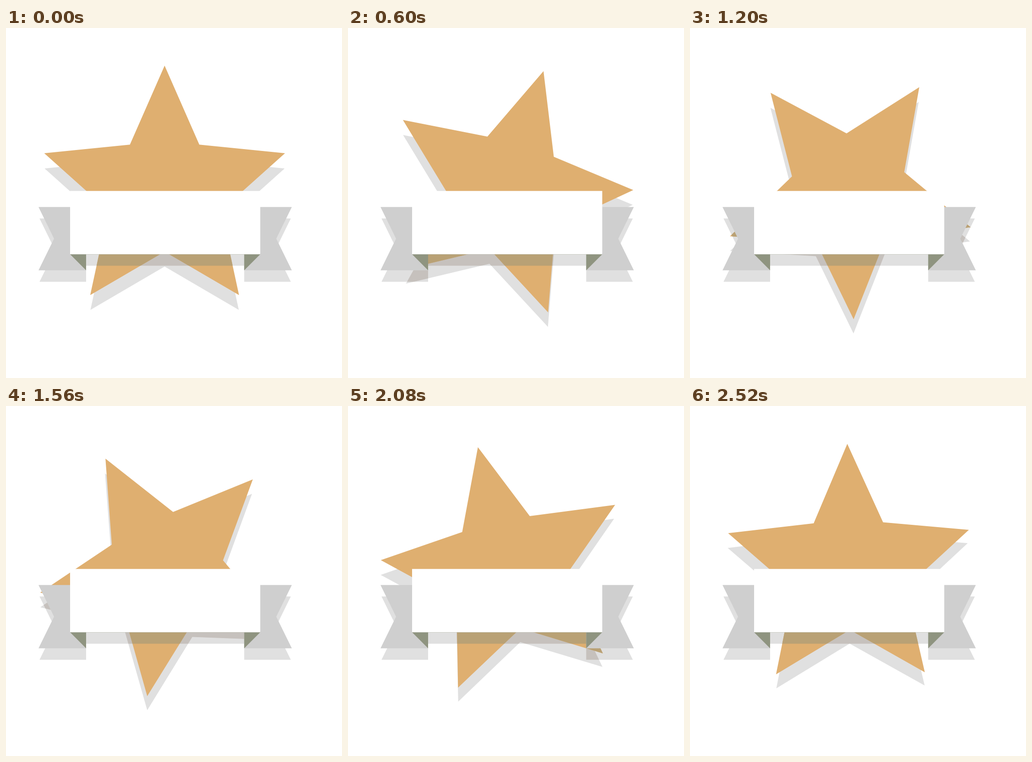
An HTML page with a canvas that plays this animation: 734x763 px, repeating every 2560 ms.

```html
<!DOCTYPE html>
<html lang="en">
<head>
<meta charset="utf-8">
<title>Star badge</title>
<style>
  html, body { margin: 0; width: 100%; height: 100%; overflow: hidden; background: #fff; }
  canvas { display: block; }
</style>
</head>
<body>
<canvas id="stage" width="734" height="763"></canvas>
<script>
const ctx = document.getElementById('stage').getContext('2d');
const LOOP = 2560, STEP = 40;
const GOLD = '#dfaf70', GOLD_SHADED = '#b9a175';
const SHADOW = '#e0e0e0', SHADOW_DOUBLE = '#c6c1bd';
const TAIL = '#cfcfcf', FOLD = '#8f9480';

// Ribbon measures: half widths from the middle, heights from the top edge.
const MIDDLE = 347.7, HALF = 207.7, TOP = 355.3, HEIGHT = 138, DROP = 35;
const BOTTOM = TOP + HEIGHT;
const INNER = HALF - DROP, OUTER = HALF + 2 * DROP - 1, NOTCH = OUTER - DROP + 1;

const polygon = points => new Path2D('M' + points.join('L') + 'Z');

function rect(left, top, right, bottom) {
  const path = new Path2D();
  path.rect(left, top, right - left, bottom - top);
  return path;
}

// One end of the ribbon; side is -1 for left and 1 for right.
function tail(side, top, inset = 0) {
  const x = distance => MIDDLE + side * distance;
  return polygon([
    [x(INNER), top], [x(OUTER - inset), top], [x(NOTCH - inset), top + HEIGHT / 2],
    [x(OUTER - inset), top + HEIGHT], [x(INNER), top + HEIGHT]
  ]);
}

const fold = side => polygon([
  [MIDDLE + side * HALF, BOTTOM], [MIDDLE + side * INNER, BOTTOM],
  [MIDDLE + side * INNER, BOTTOM + DROP]
]);

const sides = [-1, 1];
const band = rect(MIDDLE - HALF, TOP, MIDDLE + HALF, BOTTOM);
const bandEdge = rect(MIDDLE - HALF, BOTTOM - 1, MIDDLE + HALF, BOTTOM + 0.3);
const tails = sides.map(side => tail(side, TOP + DROP));
const folds = sides.map(fold);

const ribbonShadow = rect(MIDDLE - INNER, TOP + 60, MIDDLE + INNER, BOTTOM + 25);
sides.forEach(side => ribbonShadow.addPath(tail(side, TOP + 60, 2.2)));

function star(cx, cy, degrees, scale = 1) {
  const points = [];
  for (let i = 0; i < 10; i++) {
    const radius = (i % 2 ? 129 : 276.5) * scale;
    const angle = (degrees + i * 36) * Math.PI / 180;
    points.push([cx + radius * Math.sin(angle), cy - radius * Math.cos(angle)]);
  }
  return polygon(points);
}

function fill(path, color) {
  ctx.fillStyle = color;
  ctx.fill(path);
}

// The right tail winds the other way, so each part of the shadow is kept apart.
function fillShaded(path, color, shadedColor) {
  fill(path, color);
  ctx.save();
  ctx.clip(ribbonShadow);
  fill(path, shadedColor);
  ctx.restore();
}

function draw(time) {
  const p = time / LOOP;
  ctx.clearRect(0, 0, 734, 763);
  fill(ribbonShadow, SHADOW);
  fillShaded(star(346.5 - 0.3 * p, 391.4 - 2 * p, 72 * p, 0.997), SHADOW, SHADOW_DOUBLE);
  fillShaded(star(346.5 + 0.9 * p, 358.5 + 0.5 * p, 72 * p + 0.35 * p * p), GOLD, GOLD_SHADED);
  tails.forEach(path => fill(path, TAIL));
  folds.forEach(path => fill(path, FOLD));
  fill(bandEdge, FOLD);
  fill(band, '#fff');
}

function tick() {
  draw(Math.floor(performance.now() % LOOP / STEP) * STEP);
  requestAnimationFrame(tick);
}
tick();
</script>
</body>
</html>
```
